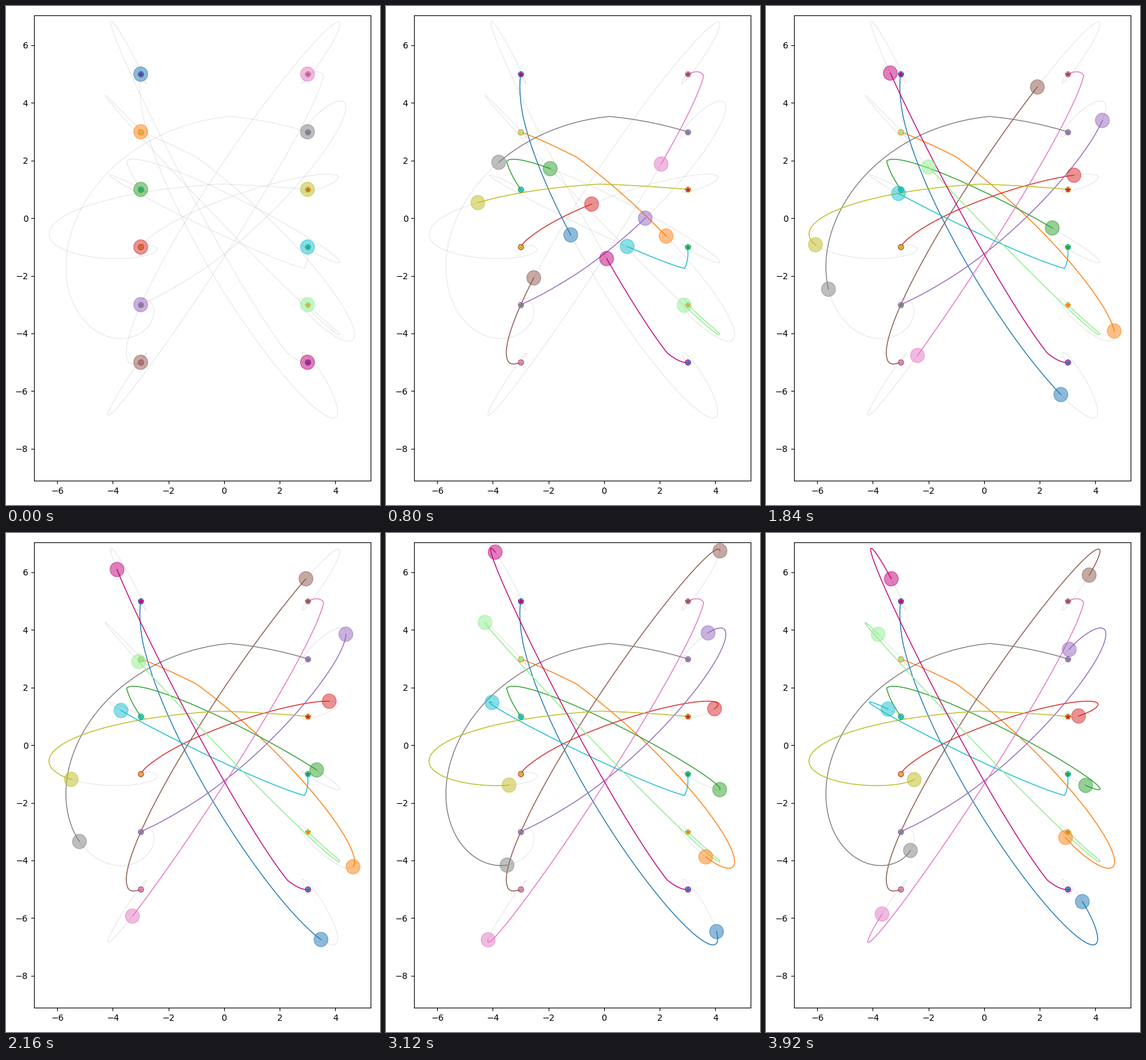
A matplotlib script that plays this animation: 600x800 px, repeating every 3960 ms.

```python
import numpy as np
import matplotlib.pyplot as plt
from matplotlib.animation import FuncAnimation
from matplotlib.patches import Circle

W, H, DPI = 600, 800, 100
FRAMES, INTERVAL = 99, 40
LEFT, TOP, WIDTH, HEIGHT = 45.2, 15.2, 540, 746   # axes box in pixels
X0, Y0, SX, SY = 349.9, 340.2, 44.6, 46.2         # origin and scale in pixels

# Each robot is pulled to its goal by a damped spring; rates are per frame.
DAMP, OMEGA = 0.0243, 0.0444
T1, T2 = 20, 62      # frames at which two points of the swing are known
KICK = 6             # frames taken to get from the start onto the swing
T_END = 220          # planned paths run on past the loop

COLORS = [f"C{i}" for i in range(10)] + ["lightgreen", "#c00078"]
KEYS = [  # x, y at T1, then x, y at T2
    (-1.20, -0.58, 3.91, -6.93),
    (2.23, -0.62, 4.39, -4.26),
    (-1.94, 1.72, 3.88, -1.23),
    (-0.45, 0.49, 4.05, 1.48),
    (1.48, 0.00, 4.28, 4.05),
    (-2.53, -2.07, 3.65, 6.50),
    (2.05, 1.88, -3.87, -6.60),
    (-3.79, 1.94, -4.64, -3.89),
    (-4.54, 0.54, -4.78, -1.34),
    (0.83, -0.98, -4.04, 1.41),
    (2.88, -3.02, -3.80, 3.68),
    (0.09, -1.40, -4.06, 6.67),
]

fig = plt.figure(figsize=(W / DPI, H / DPI), dpi=DPI, facecolor="white")
ax = fig.add_axes([LEFT / W, 1 - (TOP + HEIGHT) / H, WIDTH / W, HEIGHT / H])
ax.set_xlim((LEFT - X0) / SX, (LEFT + WIDTH - X0) / SX)
ax.set_ylim((Y0 - TOP - HEIGHT) / SY, (Y0 - TOP) / SY)
ax.set_xticks(range(-6, 5, 2))
ax.set_yticks(range(-8, 7, 2))


def make_path(start, key):
    """Damped swing about the goal through both key points, one row per frame."""
    t = np.arange(T_END + 1)[:, None]
    goal = -start
    u1 = (key[:2] - goal) * np.exp(DAMP * T1)
    u2 = (key[2:] - goal) * np.exp(DAMP * T2)
    wave = u1 * np.sin(OMEGA * (T2 - t)) + u2 * np.sin(OMEGA * (t - T1))
    swing = goal + np.exp(-DAMP * t) * wave / np.sin(OMEGA * (T2 - T1))
    fade = np.clip(1 - t / KICK, 0, 1)
    return swing + (start - swing[0]) * fade


def add_robot(index):
    color = COLORS[index]
    column, row = divmod(index, 6)
    start = np.array([6.0 * column - 3, 5.0 - 2 * row])
    path = make_path(start, np.array(KEYS[index]))
    ax.plot(*path.T, color="0.5", lw=0.15, zorder=1)
    trail, = ax.plot([], [], color=color, lw=1, zorder=2)
    ax.plot(*start, "o", ms=6, mfc="none", mec=color, mew=1, zorder=3)
    ax.plot(*-start, "*", ms=6, color=color, zorder=3.1)
    body = ax.add_patch(Circle(start, 0.25, color=color, alpha=0.5, zorder=4))
    return path, trail, body


robots = [add_robot(i) for i in range(len(COLORS))]


def update(frame):
    for path, trail, body in robots:
        trail.set_data(*path[:frame + 1].T)
        body.center = path[frame]
    return [artist for robot in robots for artist in robot[1:]]


anim = FuncAnimation(fig, update, frames=FRAMES, interval=INTERVAL,
                     init_func=lambda: update(0), repeat=True, repeat_delay=0)
plt.show()
```
